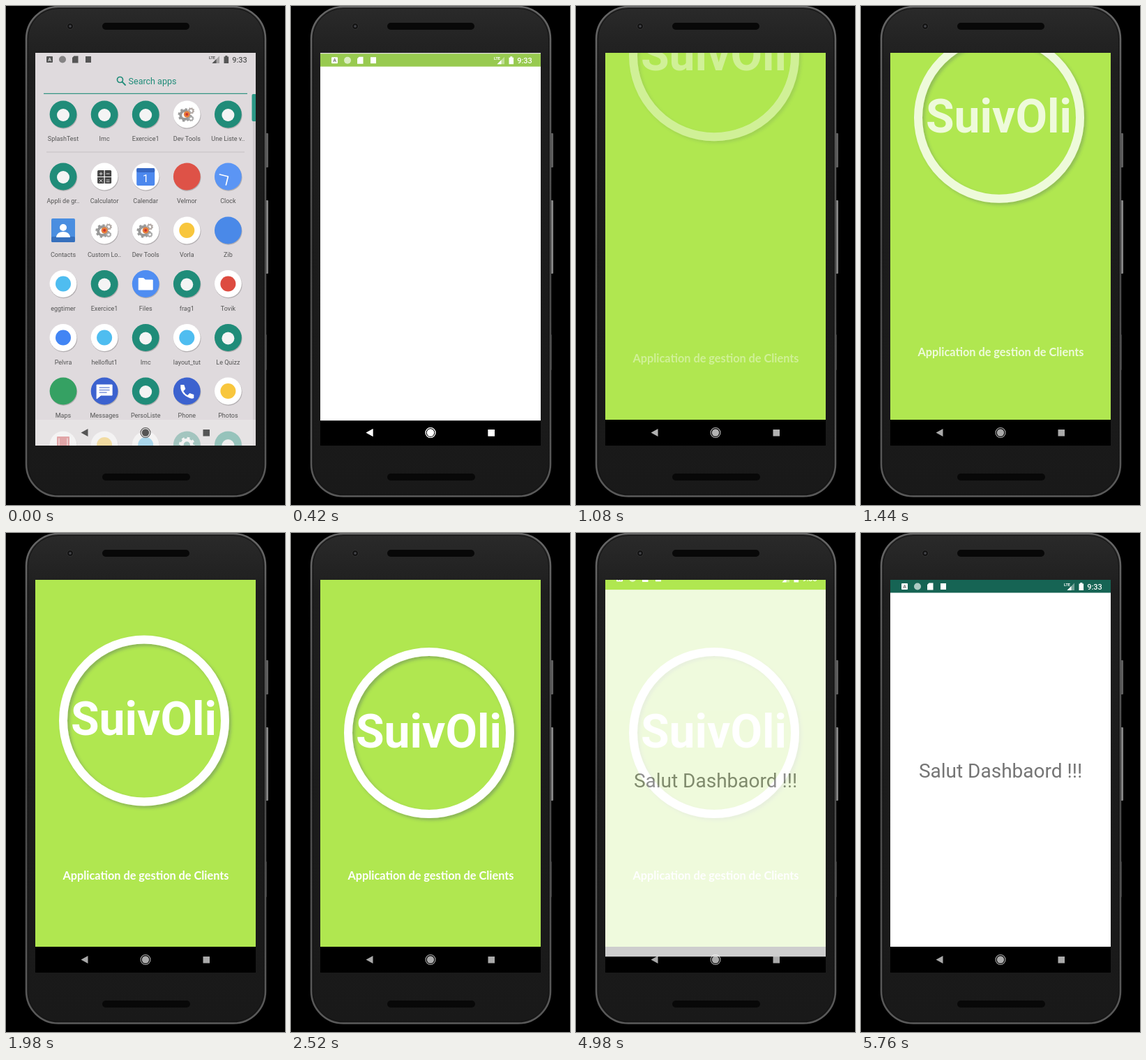
Recreate the animation shown at these times as an HTML page. Size 400 by 714 pixels, loop 5.82 s.

```html
<!DOCTYPE html>
<html lang="fr">
<head>
<meta charset="utf-8">
<title>Splash screen demo</title>
<style>
  html, body { margin: 0; width: 100%; height: 100%; overflow: hidden; background: #000; }
  svg { display: block; width: 100%; height: 100%; }
  text { font-family: Roboto, sans-serif; text-anchor: middle; }
</style>
</head>
<body>
<script>
const LOOP = 5820;
const TEAL = '#208c79', BLUE = '#4c88ee';

// Drawing helpers
const disc = (x, y, r, fill, more = '') => `<circle cx="${x}" cy="${y}" r="${r}" fill="${fill}" ${more}/>`;
const box = (x, y, w, h, fill, r = 0, more = '') =>
  `<rect x="${x}" y="${y}" width="${w}" height="${h}" rx="${r}" fill="${fill}" ${more}/>`;
const path = (d, fill, more = '') => `<path d="${d}" fill="${fill}" ${more}/>`;
const line = (d, stroke, width = 1) => path(d, 'none', `stroke="${stroke}" stroke-width="${width}" stroke-linecap="round"`);
const label = (x, y, size, fill, str, more = '') =>
  `<text x="${x}" y="${y}" font-size="${size}" fill="${fill}" ${more}>${str}</text>`;
const plate = (fill = '#fff') => disc(.6, 1.2, 19.6, '#0003') + disc(0, 0, 19.4, fill);
const gear = (x, y, r, fill) =>
  disc(x, y, r, 'none', `stroke="${fill}" stroke-width="${r * .65}"`) +
  disc(x, y, r * 1.4, 'none', `stroke="${fill}" stroke-width="${r * .45}" stroke-dasharray="${r * .55}"`);
const dot = fill => plate() + disc(0, 0, 11, fill);

// App icons, centred on 0,0
const icons = {
  app: plate(TEAL) + disc(0, 1, 9, '#f4f4f4'),
  tools: plate() + gear(-3, 1, 6, '#999') + gear(6, -5, 3, '#b3aaa6') + gear(6, 6, 2.6, '#a9a9a9') + disc(0, 0, 4.5, '#e8803c') + disc(0, 0, 2, '#c33'),
  calc: plate() + box(-10, -9, 20, 19, '#444', 1.5) + line('M0-9V10M-10 .5H10', '#fff', 1.2) +
    line('M-7-4h4M-5-6v4M3-4h4M-7 4l4 4m0-4l-4 4M3 5h4M3 7.5h4', '#ddd', 1),
  calendar: plate() + box(-13, -12, 26, 25, BLUE, 2) + box(-13, -12, 26, 6, '#3768c4', 2) + label(0, 8, 15, '#fff', '1'),
  red: plate('#de5247'),
  clock: plate('#5b95f4') + line('M0 0L-12-3M0 0L-3 12', '#fff', 1.7),
  contacts: box(-17, -17, 34, 34, '#4a8ee0', 2) + box(-17, 9, 34, 8, '#3670bd', 2) +
    disc(0, -4, 5, '#fff') + path('M-10 10Q-9 2 0 2T10 10Z', '#fff'),
  sky: dot('#4fbdf0'),
  yellow: dot('#f8c63d'),
  crimson: dot('#dd4b40'),
  blueDot: dot('#4285f4'),
  blue: plate('#4a89e8'),
  green: plate('#35a163'),
  files: plate('#4f8df2') + path('M-10-8h7l2.5 2.5H10V8.5H-10Z', '#fff', 'stroke="#fff" stroke-linejoin="round"'),
  messages: plate('#3c62cf') + path('M-11-9H11V6H-5L-11 11Z', '#fff', 'stroke="#fff" stroke-linejoin="round"') + line('M-7-5H7M-7-1.5H7M-7 2H3', '#7d95dc', 1.4),
  phone: plate('#3c62cf') + path('M-9-9h5l2 6-3 3q2 4 6 6l3-3 6 2v5q-3 2-8-1-9-4-11-13Z', '#fff'),
  film: plate() + box(-9, -12, 18, 24, '#d2464a', 1) + line('M-6-9V9M6-9V9', '#f7b9b6', 1.5),
  gear: plate('#3f9183') + gear(0, 0, 7, '#fff')
};

const rows = [
  [155, 'app SplashTest|app Imc|app Exercice1|tools Dev Tools|app Une Liste v..'],
  [244, 'app Appli de gr..|calc Calculator|calendar Calendar|red Velmor|clock Clock'],
  [321, 'contacts Contacts|tools Custom Lo..|tools Dev Tools|yellow Vorla|blue Zib'],
  [397.5, 'sky eggtimer|app Exercice1|files Files|app frag1|crimson Tovik'],
  [474.5, 'blueDot Pelvra|sky helloflut1|app Imc|sky layout_tut|app Le Quizz'],
  [551, 'green Maps|messages Messages|app PersoListe|phone Phone|yellow Photos'],
  [628, 'film |yellow |sky |gear |app ']
];
const grid = rows.map(([y, apps]) => apps.split('|').map((entry, i) => {
  const [, icon, name] = entry.match(/(\w+) (.*)/);
  const x = 82 + 59.1 * i;
  return `<g transform="translate(${x} ${y})">${icons[icon]}</g>` + label(x, y + 38, 9, '#555', name);
}).join('')).join('');

const status = c =>
  box(58, 72, 9, 9, c, 1) + label(62.5, 79.3, 7, c === '#fff' ? '#777' : '#ddd', 'A', 'font-weight="700"') +
  disc(81, 76.5, 5, c, 'opacity=".65"') +
  path('M97.5 71.5H103.5V81.5H95V74Z', c) + box(114, 72, 8, 9, c) +
  label(295.5, 75.5, 5.5, c, 'LTE', 'font-weight="700"') +
  path('M306 71.5V82H295.5Z', c, 'opacity=".4"') + path('M301.5 76V82H295.5Z', c) +
  path('M312.5 72.5h1.8v-1.5h3v1.5h1.8V82h-6.6Z', c) +
  label(335, 80.5, 11, c, '9:33', 'font-weight="500"');

const nav = c => path('M107.5 610.5L117.5 605V616Z', c) + disc(200, 610.5, 5.2, c) +
  disc(200, 610.5, 7, 'none', `stroke="${c}" stroke-width="1.1"`) + box(282.5, 606, 9.5, 9.5, c);

const phone =
  box(372.5, 182, 3.5, 49, '#5f5f5f', 1) + box(372.5, 278, 3.5, 105, '#858585', 1) + box(371, 470, 3, 51, '#333', 1) +
  box(29, 1, 343, 700.5, 'url(#body)', 46, 'stroke="url(#edge)" stroke-width="2.5"') +
  box(31.5, 3.5, 338, 695.5, 'none', 43.5, 'stroke="#141414"') +
  box(138, 24, 125, 10, '#080808', 5) + box(138, 669, 126, 10, '#080808', 5) +
  disc(92, 29, 4.5, '#131313', 'stroke="#333"') + disc(92, 29, 1.8, '#45464b');

const drawer = box(42, 67, 316, 562, '#dfdadd') + status('#555') +
  disc(163.5, 105.5, 4, 'none', `stroke="${TEAL}" stroke-width="1.7"`) + line('M166.7 108.7L171 113', TEAL, 1.8) +
  label(210, 111.5, 12.5, TEAL, 'Search apps') +
  box(54, 124.8, 292, 1.1, TEAL) + box(58, 208.5, 284, 1, '#c6c2c4') +
  box(354, 126, 5, 503, '#cfcacd') + box(352.5, 126, 6.5, 39, '#2b9886', 2) +
  grid + box(42, 592, 316, 37, '#edeaeb', 0, 'opacity=".58"') + nav('#555');

const splash = box(42, 67, 316, 525, '#fff') +
  `<g id="green">${box(42, 67, 316, 525, '#b0e750')}</g>
  <g id="badge">
    ${disc(198, 286, 116, 'none', 'stroke="#fff" stroke-width="12" filter="url(#shadow)"')}
    ${label(197.5, 307, 66, '#fff', 'SuivOli', 'font-weight="700"')}
  </g>
  <g id="tagline">${label(200.5, 495.5, 16.3, '#fff', 'Application de gestion de Clients', 'font-weight="700" style="font-family:Lato,sans-serif"')}</g>
  <g id="greenBar">${box(42, 67, 316, 18.5, '#98ca50')}${status('#fff')}</g>`;

document.body.innerHTML = `<svg viewBox="0 0 400 714">
  <defs>
    <linearGradient id="body" x2="0" y2="1"><stop stop-color="#2a2a2a"/><stop offset=".12" stop-color="#1e1e1e"/><stop offset="1" stop-color="#191919"/></linearGradient>
    <linearGradient id="edge" x2="0" y2="1"><stop stop-color="#666"/><stop offset=".5" stop-color="#484848"/><stop offset="1" stop-color="#5a5a5a"/></linearGradient>
    <filter id="shadow" x="-10%" y="-10%" width="125%" height="125%"><feDropShadow dx="3" dy="3" stdDeviation="2" flood-color="#456" flood-opacity=".35"/></filter>
    <clipPath id="screen"><rect x="42" y="67" width="316" height="562"/></clipPath>
  </defs>
  ${phone}
  <g clip-path="url(#screen)">
    ${drawer}
    <g id="navBar">${box(42, 592, 316, 37, '#000')}${nav('#aaa')}<g id="navLight">${nav('#fff')}</g></g>
    <g id="splash">${splash}</g>
    <g id="dash">${box(42, 67, 316, 525, '#fff')}${label(200, 350, 28, '#757575', 'Salut Dashbaord !!!')}</g>
    <g id="tealBar">${box(42, 67, 316, 18.5, '#166454')}</g>
    <g id="whiteStatus">${status('#fff')}</g>
  </g>
</svg>`;

// Motion
const ramp = (t, start, length) => Math.min(1, Math.max(0, (t - start) / length));
const smooth = p => (1 - Math.cos(Math.PI * p)) / 2;
const slideIn = (t, start, length) => 45 * (1 - ramp(t, start, length)) ** 5;
const set = (id, opacity, y = 0) => {
  const el = document.getElementById(id);
  el.setAttribute('opacity', opacity);
  el.setAttribute('transform', `translate(0 ${y})`);
};

function draw(t) {
  const open = ramp(t, 240, 150);
  const drop = smooth(ramp(t, 465, 1800));
  const rise = smooth(ramp(t, 465, 1400));
  const hide = ramp(t, 900, 200);
  const show = ramp(t, 4910, 200);

  set('navBar', open);
  set('navLight', 1 - hide);
  set('splash', open, slideIn(t, 240, 350));
  set('green', ramp(t, 480, 330));
  set('badge', rise, -291 * (1 - drop));
  set('tagline', rise, 25 * (1 - rise));
  set('greenBar', 1 - hide, -19 * hide);
  set('dash', ramp(t, 4890, 113), slideIn(t, 4890, 440));
  set('tealBar', ramp(t, 5020, 180));
  set('whiteStatus', show > 0 ? 1 : 0, -18 * (1 - show));
}

const begin = performance.now();
(function tick() {
  draw((performance.now() - begin) % LOOP);
  requestAnimationFrame(tick);
})();
</script>
</body>
</html>
```
